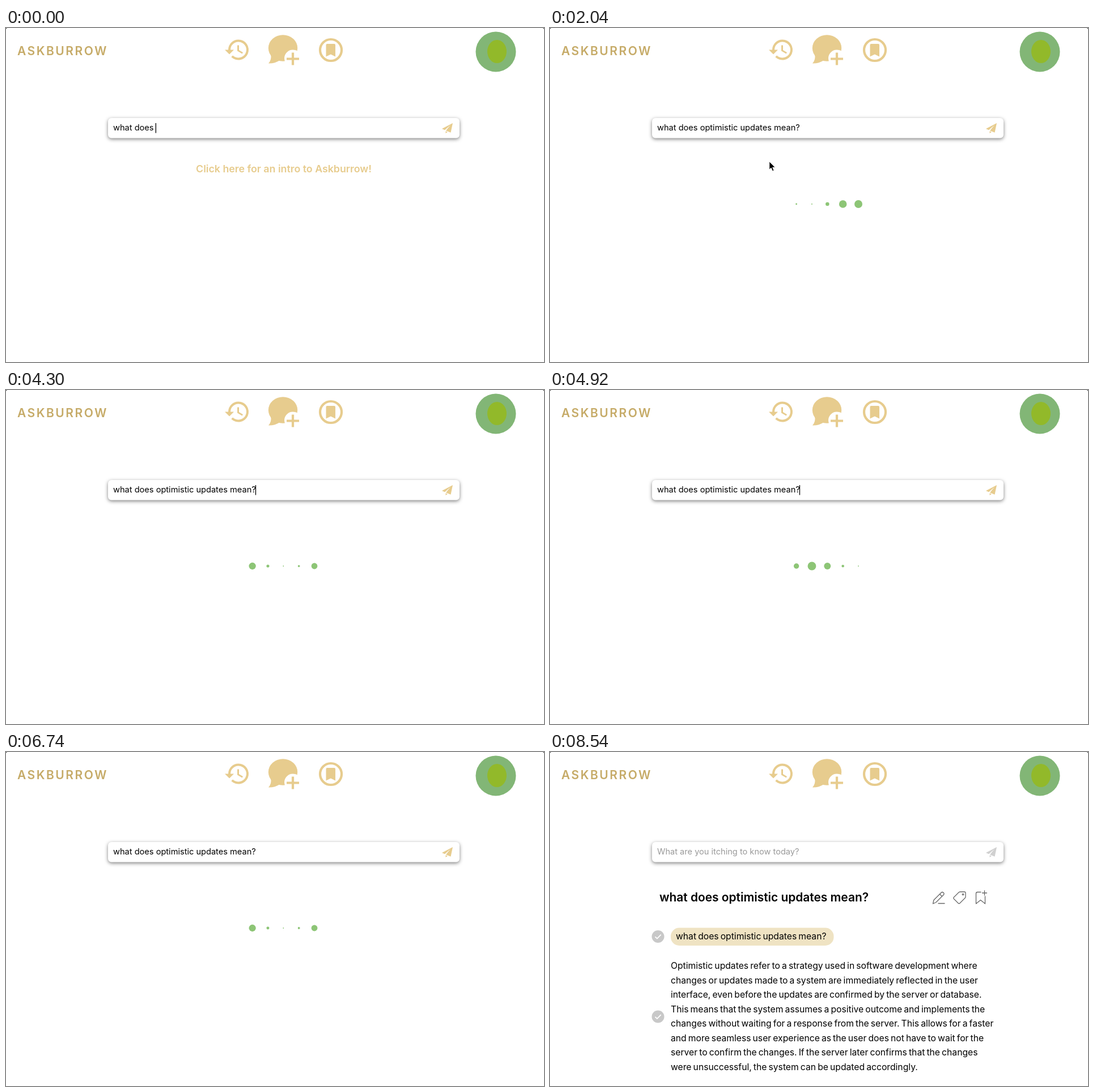
An HTML page that plays this animation: 949 by 590 pixels, repeating every 8.68 s.

```html
<!DOCTYPE html>
<html lang="en">
<head>
<meta charset="utf-8">
<title>Askburrow</title>
<style>
  html, body { margin: 0; width: 100%; height: 100%; overflow: hidden; background: #fff; }
  svg { display: block; width: 949px; height: 590px; font-family: Inter, "Open Sans", sans-serif; }
  text { white-space: pre; }
  .gold { fill: #e7cc8e; }
  .ring { fill: none; stroke: #e7cc8e; stroke-width: 4.2; }
  .line { fill: none; stroke: #666; stroke-width: 1.3; stroke-linejoin: round; stroke-linecap: round; }
  .semi { font-weight: 600; }
  .field { fill: #fff; filter: drop-shadow(0 2px 3px rgba(0, 0, 0, .5)); }
</style>
</head>
<body>
<svg viewBox="0 0 949 590">
  <defs>
    <g id="check">
      <circle r="11" fill="#c8c8c8"/>
      <path d="M-5 .3L-1.6 3.6L5.2-3.4" fill="none" stroke="#fff" stroke-width="1.8"/>
    </g>
  </defs>

  <path d="M0 0h2l-2 2zM949 0h-2l2 2z" fill="#555"/>

  <!-- Header -->
  <text class="semi" x="20" y="48" font-size="21" letter-spacing="2.5" fill="#c6ab68">ASKBURROW</text>
  <path class="gold" transform="translate(384 14.5) scale(2)" d="M13 3a9 9 0 0 0-9 9H1l3.9 3.9.1.1L9 12H6a7 7 0 1 1 2.06 4.94l-1.42 1.42A9 9 0 1 0 13 3zm-1 5v5l4.28 2.54.72-1.21-3.5-2.08V8z"/>
  <ellipse class="gold" cx="488.5" cy="35.5" rx="25.7" ry="23.3"/>
  <path class="gold" d="M467 46Q469 56 463 62.5Q474 63 483 57z"/>
  <circle cx="506" cy="53.5" r="15" fill="#fff"/>
  <path class="ring" d="M495 54.5h22M506 43.5v22"/>
  <circle class="ring" cx="573" cy="39" r="19"/>
  <path class="gold" d="M566.5 28h12.5q2 0 2 2v20.5l-8.2-4-8.3 4v-20.5q0-2 2-2z"/>
  <circle cx="864" cy="42" r="35.5" fill="#82b676"/>
  <ellipse cx="866" cy="41.5" rx="17" ry="20.5" fill="#92b92a"/>

  <!-- Search field -->
  <rect class="field" x="180" y="159" width="620" height="35.5" rx="6"/>
  <text id="query" x="189" y="181" font-size="14.6"></text>
  <rect id="caret" y="168" width="1.3" height="17.5"/>
  <path id="send" d="M788 168L769 178L774 180.3L784 171.5L776 181.2L784.5 184.7zM775.5 182.3V186L779 183.7z"/>

  <text id="intro" class="semi gold" x="490" y="254.5" font-size="17.8" text-anchor="middle">Click here for an intro to Askburrow!</text>
  <g id="loader" fill="#8dc576"></g>

  <g id="answer">
    <text class="semi" x="193" y="264" font-size="20.9">what does optimistic updates mean?</text>
    <path class="line" d="M675.5 268l1.5-6.5L690 248.5q2-2 4 0t0 4L681 265.5zM687.5 251l4 4M685 267.5h11"/>
    <path class="line" d="M724 247h7q2 0 2 2v7q0 1-1 2l-9 9q-1.5 1.5-3 0l-7.5-7.5q-1.5-1.5 0-3l9-9q1-.5 2.5-.5z"/>
    <circle class="line" cx="728.5" cy="251.5" r="1.2"/>
    <path class="line" d="M760 247.5h-6q-2.5 0-2.5 2.5v18l8-6.5 8 6.5v-13M766.5 245v8M762.5 249h8"/>
    <use href="#check" x="190.5" y="326"/>
    <use href="#check" x="190.5" y="467.5"/>
    <rect x="213" y="310.5" width="287.5" height="31.5" rx="15" fill="#efe3c3"/>
    <g font-size="15.7" word-spacing="-1.3">
      <text x="222" y="331">what does optimistic updates mean?</text>
      <g id="lines"></g>
    </g>
  </g>

  <path id="pointer" d="M0 0V14.5L3.3 11.5L5.7 17L8.3 16L5.9 10.5H10.5z" stroke="#fff"/>
</svg>

<script>
const LOOP = 8680, LOADING = 1740, ANSWERED = 7720;
const QUESTION = "what does optimistic updates mean?";
const PROMPT = "What are you itching to know today?";
const REPLY = [
  "Optimistic updates refer to a strategy used in software development where",
  "changes or updates made to a system are immediately reflected in the user",
  "interface, even before the updates are confirmed by the server or database.",
  "This means that the system assumes a positive outcome and implements the",
  "changes without waiting for a response from the server. This allows for a faster",
  "and more seamless user experience as the user does not have to wait for the",
  "server to confirm the changes. If the server later confirms that the changes",
  "were unsuccessful, the system can be updated accordingly.",
];
// Bursts of typing: start, end, characters
const BURSTS = [[40, 360, 6], [520, 860, 5], [1020, 1640, 13]];
// Loader cycle: time, waves travelled; the dots rest after the last point
const WAVES = [[0, 0], [300, .75], [1080, 2.18], [1220, 2.47], [2000, 4]];
const LOADER_CYCLE = 2560, WAVELENGTH = 5.75;
// Pointer: time, x, y
const POINTER = [[1920, 412, 208], [2040, 387, 235], [2260, 345, 390], [2440, 308, 552]];

const $ = id => document.getElementById(id);
const show = (el, on) => el.setAttribute("visibility", on ? "visible" : "hidden");

function add(parent, tag, attrs) {
  const el = document.createElementNS("http://www.w3.org/2000/svg", tag);
  for (const key in attrs) el.setAttribute(key, attrs[key]);
  return parent.appendChild(el);
}

function interpolate(points, t, column = 1) {
  const i = points.findIndex(p => p[0] > t);
  if (i < 0) return points.at(-1)[column];
  if (i === 0) return points[0][column];
  const a = points[i - 1], b = points[i];
  return a[column] + (b[column] - a[column]) * (t - a[0]) / (b[0] - a[0]);
}

function typedCount(t) {
  let count = "what does ".length;
  for (const [start, end, chars] of BURSTS)
    if (t >= start) count += Math.min(chars, 1 + Math.floor((t - start) / (end - start) * (chars - 1) + 1e-6));
  return count;
}

REPLY.forEach((line, i) => {
  add($("lines"), "text", { x: 213, y: 383 + i * 25.5 }).textContent = line;
});
const dots = Array.from({ length: 5 }, (_, i) =>
  add($("loader"), "circle", { cx: 434.6 + i * 27.35, cy: 311 }));

function drawField(t, answered) {
  const query = $("query"), caret = $("caret");
  query.textContent = answered ? PROMPT : QUESTION.slice(0, typedCount(t));
  query.setAttribute("fill", answered ? "#999" : "#000");
  caret.setAttribute("x", answered ? 189 : 188 + query.getComputedTextLength());
  show(caret, t < 1640 || Math.floor((t - 1640) / 300) % 2 === 0);

  const fade = Math.max(0, Math.min(1, (t - ANSWERED) / 80));
  const mix = (a, b) => a + (b - a) * fade;
  $("send").setAttribute("fill", `rgb(${mix(231, 208)},${mix(204, 208)},${mix(142, 208)})`);
}

function drawLoader(t) {
  const travelled = interpolate(WAVES, (t - LOADING) % LOADER_CYCLE);
  dots.forEach((dot, i) => {
    const phase = (i - 2.1) / WAVELENGTH - travelled;
    const swell = (1 - Math.cos(2 * Math.PI * phase)) / 2;
    dot.setAttribute("r", .9 + 6.6 * swell ** 1.25);
  });
}

function draw(now) {
  const t = now % LOOP;
  const answered = t >= ANSWERED, loading = t >= LOADING && !answered;
  drawField(t, answered);
  show($("intro"), t < LOADING);
  show($("loader"), loading);
  show($("answer"), answered);
  if (loading) drawLoader(t);

  show($("pointer"), t >= 1920 && t < 2460);
  $("pointer").setAttribute("transform",
    `translate(${interpolate(POINTER, t, 1)} ${interpolate(POINTER, t, 2)})`);
}

const start = performance.now();
function tick() {
  draw(performance.now() - start);
  requestAnimationFrame(tick);
}
tick();
</script>
</body>
</html>
```
